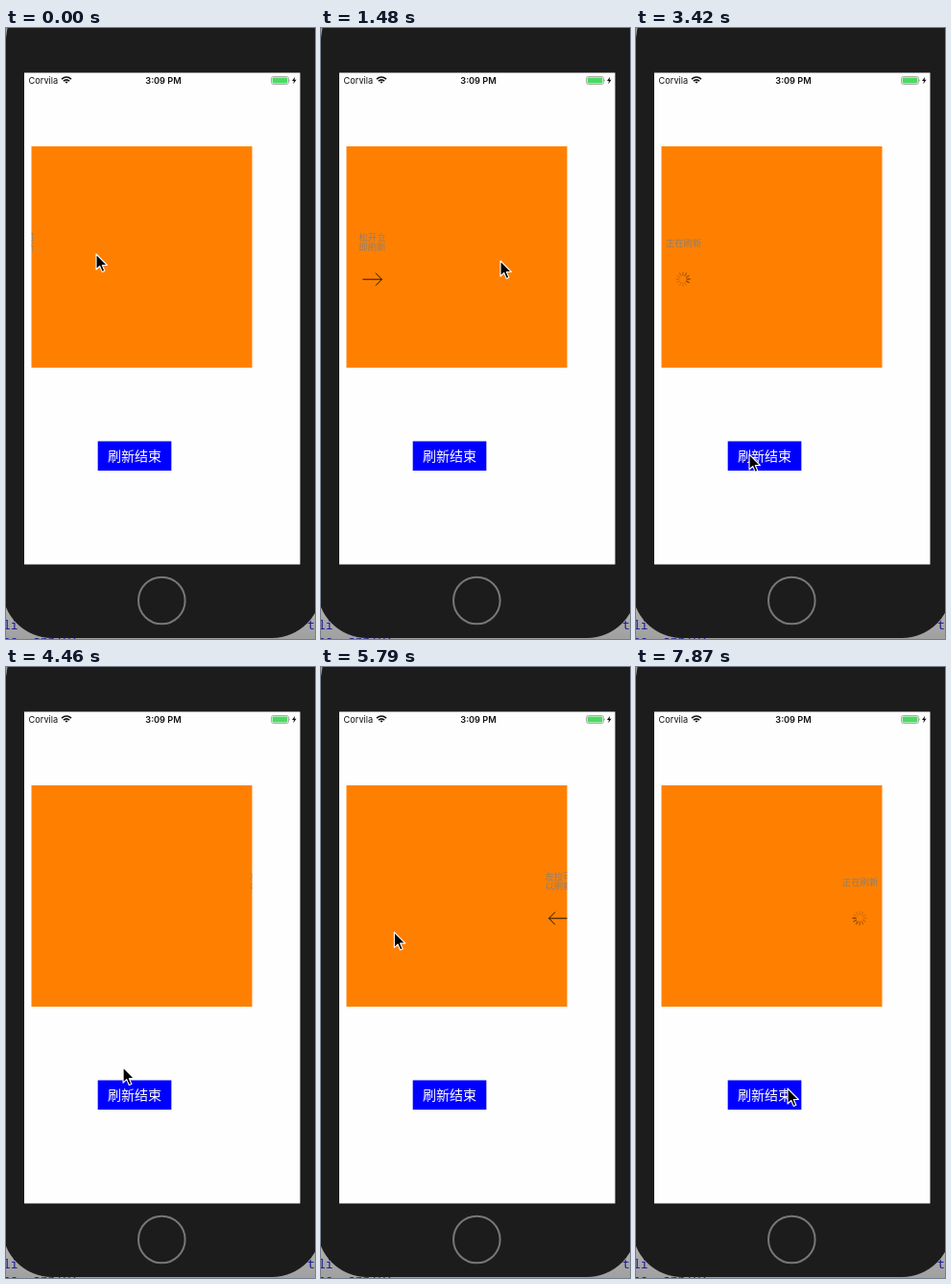
An HTML page that plays this animation: 322 px wide and 635 px high, repeating every 8000 ms.

```html
<!DOCTYPE html>
<html lang="zh-CN">
<head>
<meta charset="utf-8">
<title>Pull to refresh</title>
<style>
html, body { margin: 0; width: 100%; height: 100%; overflow: hidden; background: #1c1c1c; }
svg { display: block; width: 100vw; height: 100vh; }
.cjk { font-family: "Noto Sans CJK SC", "Noto Sans CJK", sans-serif; text-anchor: middle; }
.hint { font-size: 9.4px; fill: #858078; }
.button { font-size: 14px; font-weight: 300; fill: #fff; }
.status { font-family: Inter, sans-serif; font-size: 9.2px; fill: #111; }
.code { font-family: "Noto Sans Mono", monospace; font-size: 13px; fill: #1c1c9a; }
</style>
</head>
<body>
<svg viewBox="0 0 322 635">
  <defs>
    <clipPath id="box"><rect x="26.5" y="123" width="230" height="230"/></clipPath>
    <linearGradient id="shade" x1="0" y1="0" x2="0" y2="1">
      <stop offset=".92" stop-color="#b8b8b8"/>
      <stop offset="1" stop-color="#a0a0a0"/>
    </linearGradient>
  </defs>

  <rect width="322" height="635" fill="url(#shade)"/>
  <g class="code">
    <text x="-3" y="625">li</text>
    <text x="314" y="625">t</text>
    <text x="-3" y="641">oo. apply;</text>
  </g>
  <rect x="-4" y="-60" width="333" height="694" rx="52" fill="#1c1c1c"/>
  <path d="M0 0H1.5L0 10Z" fill="#a0a0a0"/>
  <rect x="19" y="46.5" width="287.5" height="511" fill="#fefefe"/>
  <circle cx="162.3" cy="595" r="24.3" fill="none" stroke="#777" stroke-width="2"/>

  <g class="status">
    <text x="23.6" y="57.8">Corvila</text>
    <text x="164" y="57.8" text-anchor="middle" font-weight="600">3:09 PM</text>
  </g>
  <g fill="none" stroke="#111" stroke-width="1.6">
    <path d="M58 53.2Q63 48.8 68 53.2M59.9 55.2Q63 52.4 66.1 55.2"/>
    <path d="M61.4 56L63 57.8L64.6 56Q63 54.8 61.4 56Z" fill="#111" stroke="none"/>
  </g>
  <rect x="276.5" y="50.5" width="18" height="8" rx="2" fill="none" stroke="#999" stroke-width=".8"/>
  <rect x="277.6" y="51.6" width="15.8" height="5.8" rx="1" fill="#4cd964"/>
  <path d="M295.4 53.2Q296.8 54.5 295.4 55.8Z" fill="#888"/>
  <path d="M301.2 50.8L298 55H300L299.3 58.2L302.6 53.8H300.6Z" fill="#111"/>

  <rect x="26.5" y="123" width="230" height="230" fill="#ff8000"/>
  <g clip-path="url(#box)">
    <g id="view">
      <g id="pull">
        <text class="cjk hint" id="line1" y="220.6"/>
        <text class="cjk hint" id="line2" y="231.2"/>
        <path id="arrow" d="M-10 0H10M3.5 -6.5L10 0L3.5 6.5" fill="none" stroke="#241400"/>
      </g>
      <g id="busy">
        <text class="cjk hint" y="226.6">正在刷新</text>
        <g id="spinner" transform="translate(-.5 261)" stroke="#503008" stroke-width="1.3" stroke-linecap="round"></g>
      </g>
    </g>
  </g>

  <rect x="95.67" y="429.5" width="76.67" height="30.5" fill="#00f"/>
  <text class="cjk button" x="134" y="450.2">刷新结束</text>

  <path id="cursor" d="M0 0V16L3.7 12.5L6.2 18.4L8.8 17.3L6.3 11.5H11.4Z" fill="#000" stroke="#fff" stroke-width="1.1" stroke-linejoin="round"/>
</svg>
<script>
const LOOP = 8000, FRAMES = 54, STEP = 148.55, LEAD = 14;
const VIEW = 46, LEFT = 26.5, SIZE = 230, RIGHT = LEFT + SIZE;
const RELEASE = 1700, CLICK = 3900, CLOSED = 4155, RELEASE2 = 6480;
const $ = id => document.getElementById(id);

const start = { x: 94, y: 235 };
const moves = [
  { from: 0, to: 1485, x: 187, y: 242 },     // drag right
  { from: 1634, to: 2080, x: 266, y: 379 },
  { from: 2228, to: 3119, x: 118, y: 443 },  // to the button
  { from: 4308, to: 4902, x: 144, y: 271 },
  { from: 5050, to: 6388, x: 28, y: 279 },   // drag left
  { from: 6833, to: 7427, x: 99, y: 268 },
  { from: 7427, to: 7873, x: 158, y: 438 }   // to the button
];

const spokes = Array.from({ length: 12 }, (_, i) => {
  const s = document.createElementNS("http://www.w3.org/2000/svg", "line");
  s.setAttribute("y1", -4);
  s.setAttribute("y2", -7);
  s.setAttribute("transform", `rotate(${i * 30})`);
  $("spinner").append(s);
  return s;
});

function ease(t, from, to) {
  const k = Math.min(1, Math.max(0, (t - from) / (to - from)));
  return k * k * (3 - 2 * k);
}

function pointer(t) {
  return moves.reduce((p, m) => {
    const k = ease(t, m.from, m.to);
    return { x: p.x + (m.x - p.x) * k, y: p.y + (m.y - p.y) * k };
  }, start);
}

// scroll view resistance past its edge
function rubber(d) {
  return d > 0 ? SIZE * (1 - 1 / (d * 0.55 / SIZE + 1)) : 0;
}

function state(t, x) {
  if (t < RELEASE) return { side: 0, offset: rubber(x - 71) };
  if (t < CLICK) return { side: 0, offset: VIEW, turn: t / 1000 - 0.08 };
  if (t < CLOSED) return { side: 0, offset: VIEW * (1 - ease(t, CLICK, CLOSED)) };
  if (t < RELEASE2) return { side: 1, offset: rubber(144 - x) };
  return { side: 1, offset: VIEW, turn: t / 1000 - 0.12 };
}

function render(t) {
  const { x, y } = pointer(t);
  const { side, offset, turn } = state(t, x);
  const busy = turn !== undefined;
  const center = side ? RIGHT + VIEW / 2 - offset : LEFT - VIEW / 2 + offset;

  $("cursor").setAttribute("transform", `translate(${x} ${y})`);
  $("view").setAttribute("transform", `translate(${center} 0)`);
  $("pull").style.display = busy ? "none" : "";
  $("busy").style.display = busy ? "" : "none";

  if (busy) {
    const head = Math.round(turn * 12);
    spokes.forEach((s, i) => {
      const age = ((head - i) % 12 + 12) % 12;
      s.setAttribute("opacity", Math.max(0.2, 0.75 - age * 0.09));
    });
  } else {
    const ready = offset > VIEW;
    $("line1").textContent = ready ? "松开立" : side ? "左拉可" : "右拉可";
    $("line2").textContent = ready ? "即刷新" : "以刷新";
    $("arrow").setAttribute("transform", `translate(0 261.2) scale(${side ? -1 : 1} 1)`);
  }
}

function tick() {
  const t = performance.now() % LOOP;
  render(Math.min(FRAMES - 1, Math.floor((t + LEAD) / STEP)) * STEP);
  requestAnimationFrame(tick);
}
tick();
</script>
</body>
</html>
```
